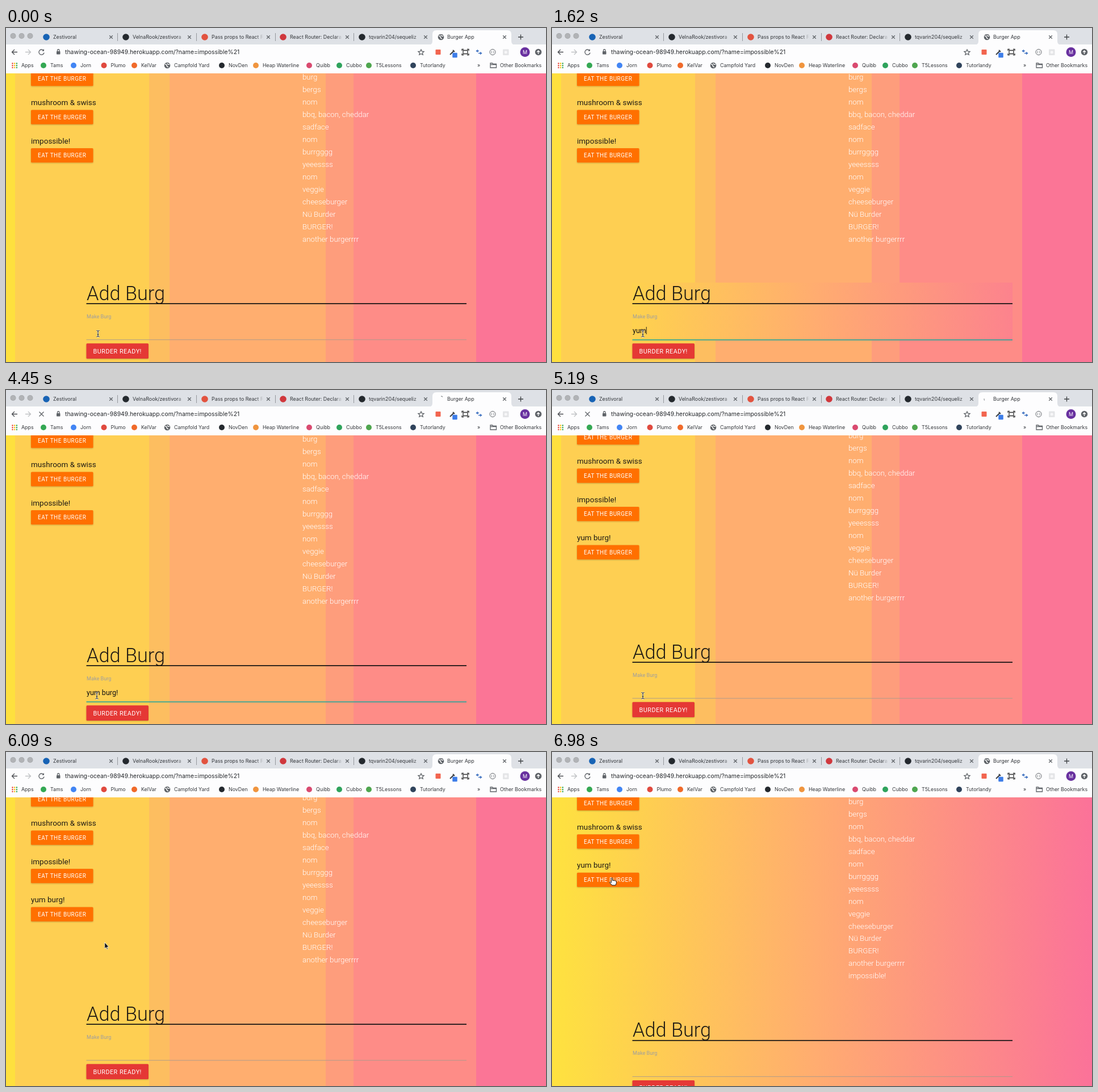
An HTML page that plays this animation: 951x589 px, repeating every 8000 ms.

```html
<!DOCTYPE html>
<html lang="en">
<head>
<meta charset="utf-8">
<title>Burger App</title>
<style>
  html, body { margin: 0; width: 100%; height: 100%; overflow: hidden; }
  svg { display: block; width: 951px; height: 589px; }
  text { white-space: pre; }
  .ui { font: 8.9px Inter, sans-serif; fill: #34373b; }
  .url { font: 10.4px Inter, sans-serif; fill: #25282c; }
  .page { font: 13.5px Roboto, sans-serif; fill: #1f1b14; }
  .list { font-size: 13.3px; font-weight: 300; fill: #fff; }
  .title { font-size: 34.3px; font-weight: 350; }
  .label { font-size: 9.1px; fill: #9e9e9e; }
  .input { font-size: 12.5px; fill: #111; }
  .btn { font-size: 10px; letter-spacing: .5px; fill: #fff; }
  .send { font-size: 10.8px; }
  .hint { font: 500 9.8px Inter, sans-serif; fill: #111; }
  .line { fill: none; stroke: #5f6368; stroke-width: 1.3; }
</style>
</head>
<body>
<svg viewBox="0 0 951 589">
  <defs>
    <linearGradient id="sun" gradientUnits="userSpaceOnUse" x1="0" x2="951">
      <stop stop-color="#fee23f"/><stop offset=".5" stop-color="#ffab71"/><stop offset="1" stop-color="#fb7299"/>
    </linearGradient>
    <linearGradient id="fade">
      <stop stop-color="#dee1e6" stop-opacity="0"/><stop offset="1" stop-color="#dee1e6"/>
    </linearGradient>
    <filter id="shadow" x="-10%" y="-20%" width="120%" height="160%">
      <feDropShadow dx="0" dy=".9" stdDeviation=".8" flood-opacity=".24"/>
    </filter>
    <clipPath id="view"><path d="M0 80H951V589H0z"/></clipPath>
  </defs>
  <g id="content" clip-path="url(#view)"></g>
  <g id="chrome"></g>
  <g id="status"></g>
  <g id="pointer"></g>
</svg>
<script>
const LOOP = 8000, FOCUS = 150, POPUP = 300, LOAD = 4300, ADDED = 5190, READY = 5340,
      MOVE = 5790, PRESS = 6830, EATEN = 6980;
const TYPING = [[1040, 'y'], [1180, 'yu'], [1480, 'yum'], [1630, 'yum b'], [1770, 'yum bu'],
  [1920, 'yum bur'], [2220, 'yum burg'], [2670, 'yum burg!']];
const BANDS = [[0, '#fee03e'], [16, '#fecf52'], [252, '#fdbe60'], [288, '#ffae6f'],
  [563, '#fe9d7c'], [612, '#fe8c87'], [828, '#fb7596']];
const EATEN_LIST = ['burg', 'bergs', 'nom', 'bbq, bacon, cheddar', 'sadface', 'nom', 'burrgggg',
  'yeeessss', 'nom', 'veggie', 'cheeseburger', 'Nü Burder', 'BURGER!', 'another burgerrrr'];

const $ = id => document.getElementById(id);
const text = (x, y, s, cls) => `<text x="${x}" y="${y}" class="${cls}">${s}</text>`;
const rect = (x, y, w, h, fill, more = '') =>
  `<rect x="${x}" y="${y}" width="${w}" height="${h}" fill="${fill}" ${more}/>`;
const dot = (x, y, r, fill) => `<circle cx="${x}" cy="${y}" r="${r}" fill="${fill}"/>`;
const path = (d, more = '') => `<path d="${d}" class="line" ${more}/>`;
const cross = (x, y, r) => path(`M${x - r} ${y - r}l${2 * r} ${2 * r}m0 ${-2 * r}l${-2 * r} ${2 * r}`);
const square = (x, y, s, fill) => rect(x - s / 2, y - s / 2, s, s, fill, 'rx="1"');
const button = (x, y, w, h, fill) => rect(x, y, w, h, fill, 'rx="1.6" filter="url(#shadow)"');
const globe = (x, y) => dot(x, y, 5.3, '#5f6368') +
  path(`M${x - 4} ${y - 2}q3 0 3 2t3 3M${x} ${y - 4}q0 3 4 2`, 'style="stroke:#fff"');

function tab(icon, title, x, close, sep) {
  return dot(x, 16, 5.8, icon) + text(x + 12, 19.3, title, 'ui') +
    rect(close - 21, 8, 12, 16, 'url(#fade)') + rect(close - 9, 8, 19, 16, '#dee1e6') +
    cross(close, 16, 2.8) + rect(sep, 9, 1, 14, '#94979c');
}

function chrome() {
  let s = rect(0, 0, 951, 30, '#dee1e6') + rect(0, 29, 951, 51, '#fdfdfe');
  for (const x of [12.5, 27.5, 42.5]) s += dot(x, 14, 5, '#a5a7aa') + dot(x, 14, 4.4, '#b1b3b6');
  s += tab('#1763b5', 'Zestivoral', 71, 185, 196) +
    tab('#24292e', 'VelnaRook/zestivora', 211, 323, 335) +
    tab('#e2533f', 'Pass props to React R', 350, 462, 474) +
    tab('#d0383d', 'React Router: Declara', 488, 601, 612) +
    tab('#24292e', 'tqvarin204/sequeliz', 627, 739, -9);
  s += '<path d="M744 30q7 0 7-7V11q0-7 7-7H883q7 0 7 7V23q0 7 7 7z" fill="#fdfdfe"/>' +
    text(777, 19.3, 'Burger App', 'ui') + cross(878, 16, 2.8) +
    path('M902 16h9M906.5 11.5v9', 'style="stroke:#3c4043"');

  // toolbar
  s += path('M20 42.5H10.5m4.5-4.5l-4.5 4.5l4.5 4.5', 'style="stroke:#4a4d51"') +
    path('M34 42.5h9.5m-4.5-4.5l4.5 4.5l-4.5 4.5', 'style="stroke:#bfc1c4"') +
    rect(89, 41, 6.5, 5.5, '#5f6368', 'rx=".8"') + path('M90.5 41v-1.5a1.7 1.7 0 0 1 3.5 0v1.5') +
    text(104, 46.2, 'thawing-ocean-98949.herokuapp.com/?name=impossible%21', 'url') +
    path('M731 38l1.5 3.2l3.5 .4l-2.6 2.3l.8 3.4l-3.2-1.8l-3.2 1.8l.8-3.4l-2.6-2.3l3.5-.4z') +
    square(761, 42.5, 9, '#f2654f') +
    path('M782 47l6-6m-1-2l3 3', 'style="stroke:#3c4043;stroke-width:2"') + square(790.5, 48, 8.5, '#3d7de8') +
    path('M805 39.5h8v6h-8zM803 40v-2.5h3m6 0h3v2.5m0 5v2.5h-3m-6 0h-3v-2.5', 'style="stroke:#333"') +
    path('M828 40.5h5m-2-2l-2.5 2l2.5 2M832 44.5h5m-2-2l2.5 2l-2.5 2', 'style="stroke:#3b6fc0"') +
    '<circle cx="857" cy="42.5" r="5" class="line" style="stroke-width:1"/>' +
    path('M855.5 40.5q-1.5 2 0 4m3-4q1.5 2 0 4', 'style="stroke-width:.8"') +
    rect(875, 37.5, 10.5, 10.5, '#e4e5e7', 'rx="1"') + dot(880.2, 42.7, 2.5, '#f7f7f8') +
    dot(914, 42.5, 8.5, '#68309f') +
    '<text x="914" y="45.7" text-anchor="middle" class="ui" style="fill:#fff">M</text>' +
    dot(937.5, 42.5, 5.7, '#5f6368') +
    path('M937.5 46v-6m-2.5 2.5l2.5-2.5l2.5 2.5', 'style="stroke:#fff"');

  // bookmarks
  const hues = ['#ea4335', '#fbbc04', '#34a853', '#4285f4'];
  for (let i = 0; i < 9; i++) {
    const row = Math.floor(i / 3);
    s += square(11.5 + i % 3 * 3.7, 62.5 + row * 3.7, 2.4, hues[(i + row) % 4]);
  }
  s += text(27, 69.3, 'Apps', 'ui');
  const marks = [[66, 'Tams', '#34a853'], [119, 'Jorn', '#4285f4'], [172.5, 'Plumo', '#e04a3f'],
    [226, 'KelVar', '#f06a2a'], [284, 'Campfold Yard', ''], [380, 'NovDen', '#24292e'],
    [440, 'Heap Waterline', '#f0953f'], [534, 'Quibb', '#d94a70'], [587, 'Cubbo', '#2fa35c'],
    [639, 'T5Lessons', '#4fa64f'], [717, 'Tutorlandy', '#30445c']];
  for (const [x, name, fill] of marks)
    s += (fill ? dot(x, 66, 5, fill) : globe(x, 66)) + text(x + 12, 69.3, name, 'ui');
  return s + text(830, 69, '»', 'ui') +
    path('M853 62h3.5l1.2 1.5H863.5v6.5H853zM853 64.5h10') + text(870, 69.3, 'Other Bookmarks', 'ui');
}

const pen = document.createElement('canvas').getContext('2d');
pen.font = '12.5px Roboto, sans-serif';

function content(t) {
  const added = t >= ADDED, eaten = t >= EATEN;
  const dy = eaten ? .8 : added ? -6 : 0, form = eaten ? 22.6 : dy;
  const focus = t >= FOCUS && !added;
  const burgers = ['', 'mushroom &amp; swiss'];
  if (!eaten) burgers.push('impossible!');
  if (added) burgers.push('yum burg!');
  const eatenList = eaten ? [...EATEN_LIST, 'impossible!'] : EATEN_LIST;

  let s = eaten ? rect(0, 80, 951, 509, 'url(#sun)')
    : BANDS.map(([x, fill]) => rect(x, 80, 951 - x, 509, fill)).join('');
  if (t >= POPUP && t < LOAD) s += rect(141, 449, 670, 102, 'url(#sun)');

  burgers.forEach((name, i) => {
    const y = 77 + dy + 67.5 * i;
    s += text(44, y - 8.5, name, 'page') + button(44, y, 109.5, 25.3, '#ff6f00');
    if (i == 2 && t >= PRESS && !eaten)
      s += `<path d="M88 ${y}H126q8 12.7 0 25.3H88q-8-12.7 0-25.3" fill="#fff" opacity=".17"/>`;
    s += text(56, y + 16.3, 'EAT THE BURGER', 'page btn');
  });
  eatenList.forEach((name, i) => s += text(522, 91 + dy + 21.97 * i, name, 'page list'));

  s += `<g transform="translate(0 ${form})">` + text(142, 479.6, 'Add Burg', 'page title') +
    rect(141.5, 485.3, 669.5, 1.7, '#111') + text(142, 511.5, 'Make Burg', 'page label') +
    (focus ? rect(141.5, 549.2, 669.5, 1.6, '#26a69a') : rect(141.5, 549.3, 669.5, .9, '#a89a8c')) +
    button(141.5, 556.3, 109.5, 26.8, '#e53935') + text(153.5, 573.6, 'BURDER READY!', 'page btn send') + '</g>';

  if (focus) {
    const typed = TYPING.filter(([at]) => t >= at).map(([, word]) => word).pop() || '';
    s += text(142, 538, typed, 'page input');
    const caret = t < 3410 || t >= 3860 && t < LOAD;
    if (typed && caret) s += rect(142 + pen.measureText(typed).width, 527, .9, 13, '#111');
    if (!typed && t >= POPUP) s += rect(141.5, 450, 143, 66, '#fff', 'rx="3" filter="url(#shadow)"') +
      text(150.5, 473, 'another burgerrrr', 'hint') + text(150.5, 499.7, 'impossible!', 'hint');
  }
  return s;
}

function status(t) {
  if (t < LOAD || t >= READY)
    return globe(766, 16) + path('M66 39.5a4.6 4.6 0 1 0 1.1 4') +
      path('M67 37v3.8h-3.8z', 'style="fill:#5f6368;stroke:none"');
  const turn = Math.floor((t - LOAD) / 150) * 60 - 60;
  return cross(62.5, 42.5, 4) +
    path('M766 11a5 5 0 0 1 3.2 1.2', `transform="rotate(${turn} 766 16)" style="stroke:#9a9da1"`);
}

function pointer(t) {
  const step = t < MOVE ? 0 : Math.min(6, Math.floor((t - MOVE) / 150) + 1), k = step / 6, j = 1 - k;
  const x = j * j * (t < FOCUS ? 162 : 160) + 2 * j * k * 214 + k * k * 107;
  const y = j * j * 539 + 2 * j * k * 300 + k * k * 228;
  const draw = (d, fill, stroke, w) =>
    `<path d="${d}" fill="${fill}" stroke="${stroke}" stroke-width="${w}" stroke-linejoin="round"/>`;
  const beam = 'M-2.5-5.5Q0-5.5 0-4Q0-5.5 2.5-5.5M0-4V4M-2.5 5.5Q0 5.5 0 4Q0 5.5 2.5 5.5M-1 1.5H1';
  const hand = 'M-2.7-5.4q1.2-1.8 2.4 0V-1.2q1.4-1.2 2.4 .2q1.4-1 2.3 .4q1.7-.6 1.9 1.2V3.6L4.8 7H-1.2L-5.4 2.4q0-2.2 2.7 0z';
  const arrow = 'M0-6V5L2.5 2.7L4.2 6.5L5.8 5.8L4.2 2.2H7.5z';
  const shape = !step ? draw(beam, 'none', '#fff', 2.2) + draw(beam, 'none', '#111', 1)
    : step == 6 ? draw(hand, '#fff', '#111', 1) : draw(arrow, '#111', '#fff', .8);
  return `<g transform="translate(${x} ${y})">${shape}</g>`;
}

$('chrome').innerHTML = chrome();
const shown = {};
function frame(now) {
  const t = now % LOOP;
  for (const part of [content, status, pointer]) {
    const s = part(t);
    if (shown[part.name] !== s) $(part.name).innerHTML = shown[part.name] = s;
  }
  requestAnimationFrame(frame);
}
frame(0);
</script>
</body>
</html>
```
